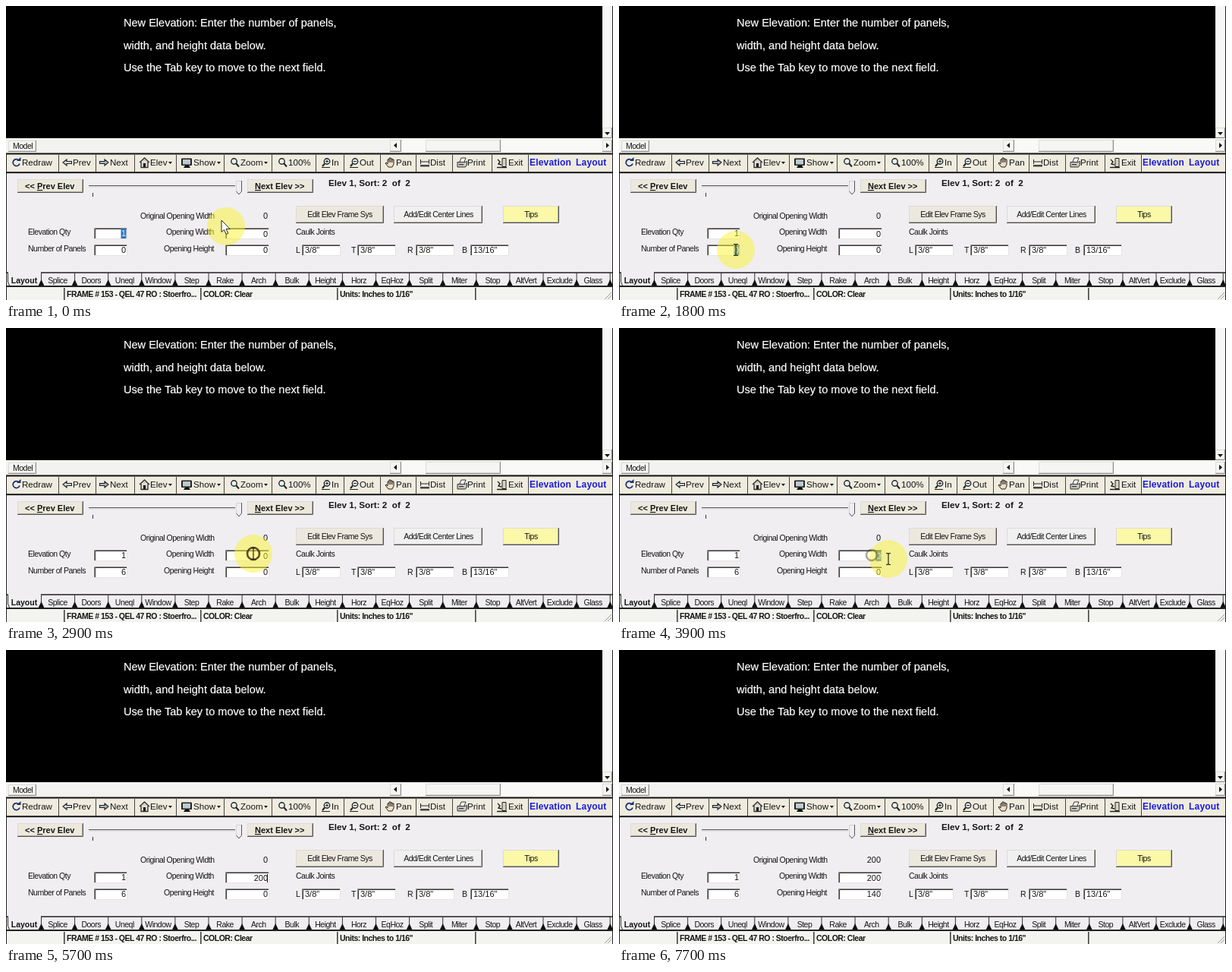
Write an HTML page that moves like this. It is 800 by 387 pixels and loops after 8 s.

```html
<!DOCTYPE html>
<html lang="en">
<head>
<meta charset="utf-8">
<title>Elevation layout</title>
<style>
  html, body { margin: 0; width: 100%; height: 100%; overflow: hidden; background: #f0eef1; }
  svg { display: block; width: 800px; height: 387px; }
  text { font-family: "Liberation Sans", Arial, sans-serif; font-size: 10.5px; letter-spacing: -.5px; fill: #151515; white-space: pre; }
  .message { font-size: 14.55px; letter-spacing: 0; fill: #fff; stroke: #fff; stroke-width: .2px; }
  .tool { font-size: 11.6px; letter-spacing: 0; }
  .value { font-size: 11px; letter-spacing: 0; }
  .bold { font-weight: bold; }
  .nav { font-size: 11px; letter-spacing: 0; font-weight: bold; }
  .sort { font-size: 11.7px; letter-spacing: 0; font-weight: bold; }
  .title { font-size: 12px; letter-spacing: .2px; font-weight: bold; fill: #1b1bdc; }
</style>
</head>
<body>
<svg id="stage" viewBox="0 0 800 387" xmlns="http://www.w3.org/2000/svg">
  <g id="window"></g>
  <g id="values"></g>
  <g id="pointer"></g>
</svg>
<script>
const LOOP = 8000, STEP = 100;
const get = id => document.getElementById(id);

const rect = (x, y, w, h, fill, extra = '') => `<rect x="${x}" y="${y}" width="${w}" height="${h}" fill="${fill}" ${extra}/>`;
const path = (d, stroke = '#222', width = 1, fill = 'none') => `<path d="${d}" fill="${fill}" stroke="${stroke}" stroke-width="${width}"/>`;
const text = (x, y, s, cls = '', anchor = 'start', extra = '') =>
  `<text x="${x}" y="${y}" class="${cls}" text-anchor="${anchor}" ${extra}>${s}</text>`;
const solid = (d, fill = '#111') => path(d, 'none', 0, fill);

function button(x, y, w, h, fill = '#ece9dc', edge = '#55544f', shade = '#aaa8a2') {
  return rect(x, y, w, h, fill) +
    path(`M${x + .5} ${y + h - .5}V${y + .5}H${x + w - .5}`, '#dddbd6') +
    path(`M${x} ${y + h - .5}H${x + w - .5}V${y}`, edge) +
    path(`M${x + 1} ${y + h - 1.5}H${x + w - 1.5}V${y + 1}`, shade);
}
const softButton = (x, y, w, h) => button(x, y, w, h, '#f5f5f3', '#8d8c88', '#deddd9');

function field(x, y, w) {
  return rect(x, y, w, 15, '#fff') +
    path(`M${x + .5} ${y + 15}V${y + .5}H${x + w}`, '#8b8a86') +
    path(`M${x + 1.5} ${y + 14}V${y + 1.5}H${x + w - 1}`, '#383836') +
    path(`M${x} ${y + 14.5}H${x + w - .5}V${y}`, '#e4e3e0');
}

const glass = (x, handle) => path(handle, '#222', 2) +
  `<circle cx="${x}" cy="204.5" r="3.7" fill="#e6f1f5" stroke="#222" stroke-width="1.4"/>`;
const signedLens = (x, sign) => glass(x + 7, `M${x + 4} 207.500L${x + 1} 211`) +
  path(`M${x + 5} 204.500h4M${x} 212.500h11${sign}`);

const icons = {
  redraw: x => path(`M${x + 10} 203a4.5 4.5 0 1 0 1 4.5`, '#1b2f70', 1.7) + solid(`M${x + 7} 204h5.5v-5z`, '#1b2f70'),
  back: x => path(`M${x + 5} 202L${x} 206l5 4v-2.500h6.500v-3h-6.500z`, '#222', 1.1, '#cfd6de'),
  next: x => path(`M${x + 7} 202l5 4l-5 4v-2.500h-6.500v-3h6.500z`, '#222', 1.1, '#a9b6c4'),
  house: x => path(`M${x} 206l6.500 -6l6.500 6M${x + 2} 205v7.500h9v-7.500`, '#333', 1.3, '#d4d2c9') + solid(`M${x + 5} 207h3v5h-3z`),
  screen: x => rect(x, 200.5, 14, 9.5, '#222', 'rx="1"') + rect(x + 2, 202, 10, 6.5, '#bccad0') + solid(`M${x + 3} 213h9l-2 -3h-5z`),
  lens: x => glass(x + 4.5, `M${x + 7} 207l4 4.500`),
  plus: x => signedLens(x, `M${x + 7} 202.500v4`),
  minus: x => signedLens(x, ''),
  hand: x => path(`M${x + 4} 212l-4 -5l1 -1l2 2v-6h2v-2h2v1h2v1h2v6l-2 4z`, '#222', 1, '#f1dfc4') + path(`M${x + 5} 206v-4m2 4v-5m2 5v-4`),
  ruler: x => path(`M${x + .5} 202v6M${x + 11.5} 202v6M${x + 1} 205h10`) + rect(x, 209, 12, 2.5, '#444'),
  printer: x => path(`M${x + 3} 205l2 -5h6l-2 5`, '#333', 1, '#fff') + path(`M${x} 205.500h11l1.500 -1.500v5l-2 3h-10.500z`, '#333', 1, '#c5c4bd') + rect(x + 2, 208, 6, 1.2, '#333'),
  door: x => path(`M${x + 7} 200.500h5v11h-5z`, '#222', 1, '#d8d4c0') + path(`M${x} 212.500h13M${x + 1} 202l3 3l-2 3l4 1`, '#222', 1.4)
};

// icon, icon x, label, label x, separator x, menu arrow x
const tools = [
  ['redraw', 7, 'Redraw', 21, 69], ['back', 75, 'Prev', 88, 118], ['next', 123, 'Next', 137, 169],
  ['house', 176, 'Elev', 190, 224, 214], ['screen', 231, 'Show', 247, 287, 278],
  ['lens', 296, 'Zoom', 309, 350, 340], ['lens', 359, '100%', 372, 408], ['plus', 416, 'In', 429, 445],
  ['minus', 453, 'Out', 466, 493], ['hand', 500, 'Pan', 514, 540], ['ruler', 546, 'Dist', 559, 588],
  ['printer', 595, 'Print', 608, 640], ['door', 647, 'Exit', 662, 688]
];
const tabs = 'Layout Splice Doors Uneql Window Step Rake Arch Bulk Height Horz EqHoz Split Miter Stop AltVert Exclude Glass'.split(' ');

function drawWindow() {
  const parts = [rect(0, 0, 800, 387, '#f0eef1'), rect(0, 0, 786, 174, '#000')];
  ['New Elevation: Enter the number of panels,', 'width, and height data below.', 'Use the Tab key to move to the next field.']
    .forEach((line, i) => parts.push(text(155, 27.3 + i * 29.2, line, 'message')));

  // scroll bars and model tab
  parts.push(rect(786, 0, 14, 160, '#f7f7f5'), softButton(786, 160, 13, 14), solid('M789 166h7l-3.5 4z'),
    rect(0, 174, 800, 19, '#f2f2f0'), softButton(3, 177, 37, 15), text(9, 188, 'Model'),
    rect(521, 176, 265, 16, '#f9f9f7'), softButton(506, 176, 15, 16), softButton(553, 176, 99, 16), softButton(786, 176, 13, 16),
    solid('M515 180v7l-4 -3.5z'), solid('M791 180v7l4 -3.5z'));

  // toolbar
  parts.push(rect(0, 195, 800, 24, '#efecdf'), rect(0, 193.5, 800, 2, '#111'));
  for (const [icon, ix, label, x, sep, menu] of tools) {
    parts.push(icons[icon](ix), text(x, 210, label, 'tool'), path(`M${sep + .5} 196v22`, '#444'));
    if (menu) parts.push(solid(`M${menu} 205h5l-2.5 3z`));
  }
  parts.push(text(690, 209.6, 'Elevation', 'title'), text(751, 209.6, 'Layout', 'title'), rect(0, 218.2, 800, 2, '#151515'));

  // navigation
  parts.push(button(15, 228, 87, 18), text(25, 241, '&lt;&lt; <tspan text-decoration="underline">P</tspan>rev Elev', 'nav'),
    button(318, 228, 87, 18), text(328, 241, '<tspan text-decoration="underline">N</tspan>ext Elev &gt;&gt;', 'nav'),
    path('M109 236.500H302', '#555'), path('M109 238H302', '#d0d0cc'), path('M114.500 246v5', '#333'),
    path('M303.500 244V230.500H310', '#d5d4cf'), path('M310.500 230v14l-3.500 4l-3.500 -4', '#555'),
    text(425, 237, 'Elev 1, Sort: 2  of  2', 'sort'));

  // form
  parts.push(text(177, 279.6, 'Original Opening Width'), text(29, 301.2, 'Elevation Qty'), text(29, 323.2, 'Number of Panels'),
    text(211, 301.2, 'Opening Width'), text(208, 323.2, 'Opening Height'), text(382, 301.2, 'Caulk Joints'),
    button(382, 263, 116, 23, '#ece8de'), text(440, 278, 'Edit Elev Frame Sys', '', 'middle'),
    button(511, 263, 117, 23, '#f1f0f1'), text(570, 277.6, 'Add/Edit Center Lines', '', 'middle'),
    button(655, 263, 74, 23, '#fbf8a8'), text(692, 278, 'Tips', '', 'middle'));
  for (const y of [292, 314]) parts.push(field(116, y, 44), field(289, y, 58));
  [['L', 382, 390, '3/8"'], ['T', 455, 463, '3/8"'], ['R', 529, 540, '3/8"'], ['B', 601, 612, '13/16"']]
    .forEach(([name, x, fx, value]) => parts.push(text(x, 325, name), field(fx, 314, 51), text(fx + 4, 325, value, 'value')));

  // tabs
  parts.push(path('M0 351H3M46 351H800', '#222', 1.4));
  tabs.forEach((name, i) => {
    const x = 46.5 + i * 44.1;
    parts.push(
      text(24 + i * 44.1, 364.7, name, i ? '' : 'bold', 'middle', i ? '' : 'style="letter-spacing:0"'),
      path(`M${x} 351v11`, '#333'), solid(`M${x} 360l4 8.500h-8z`));
  });
  parts.push(path('M2.500 351v12l2 5', '#333'));

  // status bar
  parts.push(rect(0, 368, 800, 2, '#222'), rect(0, 370, 800, 17, '#f3f3f0'));
  [[77, 'FRAME # 153 - QEL 47 RO : Stoerfro...'], [257, 'COLOR: Clear'], [437, 'Units: Inches to 1/16"'], [619, '']]
    .forEach(([x, label]) => parts.push(rect(x - 1, 371, 1.6, 16, '#444'), text(x + 3, 383, label, 'bold')));
  parts.push(path('M789 386l9 -9m-5 9l5 -5', '#9a9994'),
    rect(0, 194, 1, 193, '#222'), rect(799, 0, 1, 387, '#222'));
  get('window').innerHTML = parts.join('');
}

// time, x, y of the highlight centre
const track = [
  [0, 290, 290], [200, 245, 312], [400, 180, 340], [600, 149, 327], [700, 149, 327], [1000, 151, 322],
  [1200, 150, 316], [1400, 149, 322], [1500, 149, 322], [1800, 154, 321], [2100, 156, 323], [2200, 190, 328],
  [2400, 271, 323], [2800, 326, 297], [2900, 326, 297], [3300, 343, 301], [3400, 345, 302], [3500, 345, 302],
  [3700, 333, 299], [3900, 355, 304], [4000, 359, 304], [4400, 291, 315], [5700, 291, 315], [5800, 257, 319],
  [6000, 275, 359], [6300, 335, 336], [6400, 344, 326], [6500, 337, 326], [6700, 339, 328], [7200, 340, 326]
];
const clicks = [[1000, 151, 322], [2900, 326, 297], [3700, 333, 299], [6500, 337, 326]];
const between = (t, a, b) => t >= a && t < b;

function position(t) {
  const i = track.findIndex(k => k[0] > t);
  if (i < 0) return track[track.length - 1].slice(1);
  const [a, b] = [track[i - 1], track[i]], p = (t - a[0]) / (b[0] - a[0]);
  return [a[1] + (b[1] - a[1]) * p, a[2] + (b[2] - a[2]) * p];
}

function visibility(t) {
  if (t < 2100 || between(t, 2200, 4500) || between(t, 5800, 7600)) return 1;
  return between(t, 4500, 4800) ? (4800 - t) / 400 : 0;
}

// The start of a word, one letter per key press so far.
const typed = (t, word, times) => word.slice(0, times.filter(k => k <= t).length) || '0';

function entry(x, y, value, selected, caret) {
  return (selected ? rect(x - 6.5, y - 10, 7, 13, '#2f73bd') : '') +
    text(x, y, value, 'value', 'end', selected ? 'style="fill:#eef5ff"' : '') +
    (caret ? path(`M${x - .5} ${y - 9}v11`, '#111') : '');
}

function drawValues(t) {
  get('values').innerHTML =
    text(345, 280, t < 6600 ? '0' : '200', 'value', 'end') +
    entry(158, 303, '1', t < 1000) +
    entry(158, 325, t < 2100 ? '0' : '6', between(t, 1500, 2100), between(t, 2100, 2900)) +
    entry(345, 304, typed(t, '200', [4800, 5000, 5200]), between(t, 3800, 4800), between(t, 5700, 6500)) +
    entry(345, 325, typed(t, '140', [7500, 7600, 7700]), between(t, 6800, 7500));
}

function drawPointer(t) {
  const [x, y] = position(t);
  const inside = (a, b) => between(x, a, b) && (between(y, 292, 308) || between(y, 314, 330));
  const beam = inside(116, 160) || inside(289, 347) || between(t, 3700, 4100);
  const shape = beam
    ? path('M-3 -7.500h2l1 1l1 -1h2M0 -6.500v13M-3 7.500h2l1 -1l1 1h2', '#222', 1.2)
    : path('M-6 -8v15.500l3.500 -3l2.700 6l2.600 -1.200l-2.700 -5.800h5z', '#222', 1, '#fff');
  const rings = clicks.map(([at, cx, cy]) => between(t, at, at + 400)
    ? `<circle cx="${cx}" cy="${cy}" r="${8 - (t - at) / 200}" fill="none" stroke="#4e3a1c" stroke-width="2.6" opacity="${.9 - (t - at) / 450}"/>` : '');
  get('pointer').innerHTML =
    `<circle cx="${x}" cy="${y}" r="25" fill="#fbf430" opacity="${visibility(t) * .5}"/>` +
    rings.join('') +
    `<g opacity="${visibility(t)}" transform="translate(${x} ${y})">${shape}</g>`;
}

let shown = -1;
function frame(now) {
  const t = Math.floor(now % LOOP / STEP) * STEP;
  if (t !== shown) {
    shown = t;
    drawValues(t);
    drawPointer(t);
  }
  requestAnimationFrame(frame);
}

drawWindow();
frame(performance.now());
</script>
</body>
</html>
```
